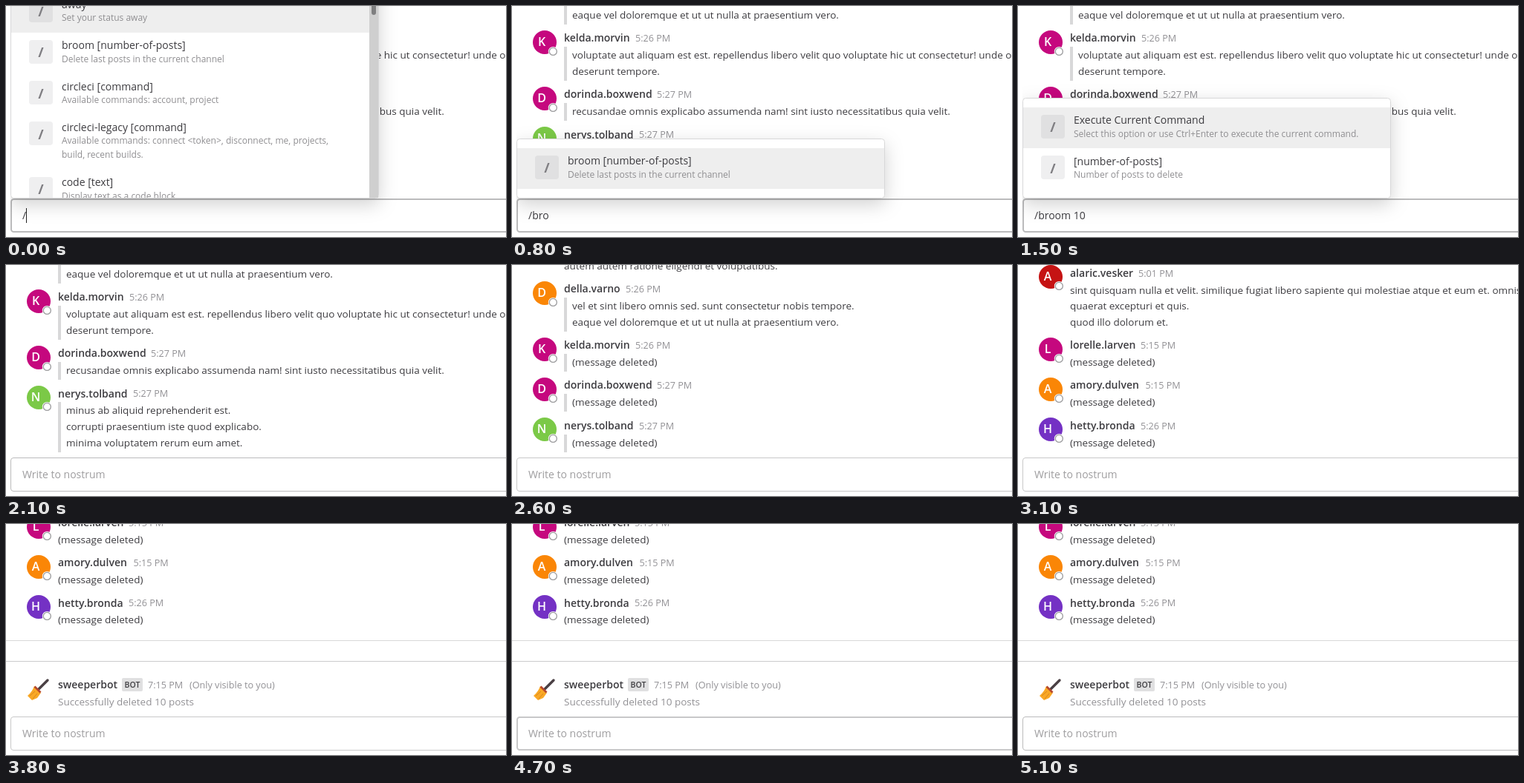
Write an HTML page that moves like this. It is 673 px wide and 312 px high and loops after 5400 ms.

```html
<!DOCTYPE html>
<html lang="en">
<head>
<meta charset="utf-8">
<title>Broom command</title>
<style>
  html, body { margin: 0; width: 100%; height: 100%; overflow: hidden; background: #fff; }
  svg { display: block; width: 673px; height: 312px; font-family: "Open Sans", sans-serif; fill: #3d3c40; }
  text { white-space: pre; }
  .popup-box { fill: #fff; stroke: #d8d8d9; filter: drop-shadow(0 8px 12px rgba(0, 0, 0, .18)); }
</style>
</head>
<body>
<svg id="stage" viewBox="0 0 673 312"></svg>
<script>
const LOOP = 5400;
const MUTED = '#929195';
const LINE = 21.6;
const MAGENTA = '#c5087e', ORANGE = '#fa8606', GREEN = '#7bc947', RED = '#c51313', PURPLE = '#7431c4';

// Oldest first; replies belong to the thread started by the post before them.
const posts = [
  { name: 'lorna.dustel', time: '5:01 PM', timeX: 160, color: GREEN,
    lines: ['et dolorem aut quia nesciunt. voluptas sed omnis rerum et quasi tempora. ut eaque iste natus error sit.', 'rerum et quasi velit.'] },
  { name: 'alaric.vesker', time: '5:01 PM', timeX: 162, color: RED,
    lines: ['sint quisquam nulla et velit. similique fugiat libero sapiente qui molestiae atque et eum et. omnis qui', 'quaerat excepturi et quis.', 'quod illo dolorum et.'] },
  { name: 'lorelle.larven', time: '5:15 PM', timeX: 165, color: MAGENTA,
    lines: ['qui dolores et quas molestias. sed ut perspiciatis unde omnis iste natus voluptatem et fugit rerum.', 'tempora autem est.'] },
  { name: 'amory.dulven', time: '5:15 PM', timeX: 171.5, color: ORANGE,
    lines: ['aut odit fugit et consequuntur magni dolores.'] },
  { name: 'hetty.bronda', time: '5:26 PM', timeX: 165, color: PURPLE,
    lines: ['nihil molestiae quia et voluptas. aspernatur aut odit sed quia consequuntur magni dolores eos qui.', 'autem autem ratione eligendi et voluptatibus.'] },
  { name: 'della.varno', time: '5:26 PM', timeX: 153, color: ORANGE, reply: true,
    lines: ['vel et sint libero omnis sed. sunt consectetur nobis tempore.', 'eaque vel doloremque et ut ut nulla at praesentium vero.'] },
  { name: 'kelda.morvin', time: '5:26 PM', timeX: 166, color: MAGENTA, reply: true,
    lines: ['voluptate aut aliquam est est. repellendus libero velit quo voluptate hic ut consectetur! unde omnis', 'deserunt tempore.'] },
  { name: 'dorinda.boxwend', time: '5:27 PM', timeX: 195, color: MAGENTA, reply: true,
    lines: ['recusandae omnis explicabo assumenda nam! sint iusto necessitatibus quia velit.'] },
  { name: 'nerys.tolband', time: '5:27 PM', timeX: 171, color: GREEN, reply: true,
    lines: ['minus ab aliquid reprehenderit est.', 'corrupti praesentium iste quod explicabo.', 'minima voluptatem rerum eum amet.'] }
];
const ROOT_DELETED = 5;

const broom = ['broom [number-of-posts]', 'Delete last posts in the current channel'];
const popups = {
  all: { top: -40, first: -19.4, scroll: true, items: [
    ['away', 'Set your status away'],
    broom,
    ['circleci [command]', 'Available commands: account, project'],
    ['circleci-legacy [command]', 'Available commands: connect &lt;token&gt;, disconnect, me, projects,', 'build, recent builds.'],
    ['code [text]', 'Display text as a code block']
  ] },
  match: { top: 180, first: 192, items: [broom] },
  args: { top: 125, first: 137, items: [
    ['Execute Current Command', 'Select this option or use Ctrl+Enter to execute the current command.'],
    ['[number-of-posts]', 'Number of posts to delete']
  ] }
};

// Each step keeps the values of the one before it.
const steps = [
  [0, { typed: '/', popup: 'all', caret: true, focus: true, border: '#bbbbbc', deleted: 0, bot: false }],
  [600, { typed: '/b', popup: 'match', caret: false }],
  [700, { typed: '/br' }],
  [800, { typed: '/bro' }],
  [900, { typed: '/broo' }],
  [1000, { typed: '/broom' }],
  [1200, { typed: '/broom ', popup: 'args' }],
  [1400, { typed: '/broom 1' }],
  [1500, { typed: '/broom 10' }],
  [2100, { typed: '', popup: '', focus: false }],
  [2300, { deleted: 1, border: '#c8c8c9' }],
  [2400, { deleted: 2 }],
  [2600, { deleted: 3 }],
  [2700, { deleted: 4 }],
  [2900, { deleted: 5 }],
  [3000, { deleted: 6 }],
  [3100, { deleted: 7 }],
  [3200, { deleted: 8 }],
  [3300, { deleted: 9 }],
  [3800, { bot: true }],
  [4000, { focus: true }],
  [5100, { focus: false, border: '#bbbbbc' }]
];
let state = {};
const states = steps.map(([, change]) => (state = { ...state, ...change }));

// y is the middle of the line of text
const text = (x, y, str, size = 13.5, extra = '') =>
  `<text x="${x}" y="${Math.round(y + size * .37)}" font-size="${size}" ${extra}>${str}</text>`;
const rect = (x, y, w, h, fill, extra = '') =>
  `<rect x="${x}" y="${y}" width="${w}" height="${h}" fill="${fill}" ${extra}/>`;
const fill = color => `fill="${color}"`;
const BOLD = 'font-weight="600"';

function avatar(post, nameY) {
  const y = Math.round(nameY + 5.8);
  return `<circle cx="44" cy="${y}" r="16" fill="${post.color}"/>` +
    text(40, y - .6, post.name[0].toUpperCase(), 16, `fill="#fff" text-anchor="middle" ${BOLD}`) +
    `<circle cx="55.3" cy="${y + 12.4}" r="6.5" fill="#fff"/>` +
    `<circle cx="55.3" cy="${y + 12.4}" r="5" fill="#fff" stroke="#9a9a9c" stroke-width="1.3"/>`;
}

function chat({ deleted, bot }) {
  const visible = deleted >= ROOT_DELETED ? posts.filter(p => !p.reply) : posts;
  let out = '', bottom = bot ? 130 : 240.2;
  for (const post of [...visible].reverse()) {
    const gone = posts.length - posts.indexOf(post) <= deleted;
    const lines = gone ? ['(message deleted)'] : post.lines;
    const first = bottom - LINE * (lines.length - 1);
    const nameY = first - 23.6;
    if (post.reply) {
      const barTop = Math.floor(first - 11.2);
      out += rect(70, barTop, 4, Math.ceil(bottom + 12) - barTop, '#d8d8d9');
    }
    lines.forEach((line, i) => out += text(post.reply ? 81 : 70, first + i * LINE - .55, line));
    out += text(70, nameY, post.name, 14, BOLD) +
      text(post.timeX, nameY + .4, post.time, 12.6, fill(MUTED)) + avatar(post, nameY);
    bottom = nameY - 30.7;
    if (bottom < -12) break;
  }
  return out + (bot ? botPost() : '');
}

function botPost() {
  return rect(0, 157, 673, 1, '#d8d8d9') + rect(0, 185, 673, 1, '#cbcbcc') +
    `<path d="M56 211L42 225" stroke="#4a4044" stroke-width="3.4" stroke-linecap="round"/>
     <path d="M38 219L47 228L42 235L35 238L29 232Q35 227 38 219Z" fill="#f9a825"/>
     <path d="M32 232L39 226M36 236L42 229" stroke="#d9861c" stroke-width="1"/>
     <path d="M38.5 219.5L46.5 227.5" stroke="#b5472f" stroke-width="2.6"/>` +
    text(70, 217, 'sweeperbot', 14, BOLD) +
    rect(156, 208, 28, 18, '#e0e0e1', 'rx="2"') +
    text(170, 217, 'BOT', 10.5, BOLD + ' text-anchor="middle"') +
    text(191, 217.4, '7:15 PM', 12.6, fill(MUTED)) +
    text(247, 217.4, '(Only visible to you)', 12.6, fill(MUTED)) +
    text(70, 240.2, 'Successfully deleted 10 posts', 13.5, fill(MUTED));
}

function popup(key) {
  const { top, first, items, scroll } = popups[key];
  const box = `<rect class="popup-box" x="6.5" y="${top - .5}" width="495" height="${260 - top}" rx="4"/>`;
  let out = '', y = first;
  items.forEach(([title, ...notes], i) => {
    const height = 55.4 + (notes.length - 1) * 18.8;
    if (i === 0) out += rect(7, Math.round(y), 494, Math.round(height), '#eeeeee');
    out += rect(31, Math.round(y + 9.6), 32, 32, i ? '#efeff0' : '#e0e0e1', 'rx="4"') +
      text(47, y + 26.6, '/', 18, 'fill="#7f7e82" font-weight="700" text-anchor="middle"') +
      text(75, y + 17, title, 14);
    notes.forEach((note, n) => out += text(75, y + 35.2 + n * 18.8, note, 12, fill('#8f8e91')));
    y += height;
  });
  if (scroll) out += rect(489, 0, 12, 259, '#cfcfcf') + rect(492, -20, 6, 32, '#7f7f80', 'rx="3"');
  return `<g clip-path="url(#shadowArea)">${box}</g><g clip-path="url(#listArea)">${out}</g>`;
}

function input({ typed, caret, focus, border }) {
  const ring = focus ? 2 : 1;
  return rect(0, 260, 673, 52, '#fff') +
    rect(6 + ring / 2, 260 + ring / 2, 700, 46 - ring, '#fff', `rx="3.5" stroke="${border}" stroke-width="${ring}"`) +
    (typed ? text(22, 283, typed, 14) : text(22, 283, 'Write to nostrum', 14, fill('#9e9d9f'))) +
    (caret ? rect(27, 273, 1, 20, '#222') : '');
}

const stage = document.getElementById('stage');
const clips = '<clipPath id="shadowArea"><rect x="6" y="0" width="667" height="312"/></clipPath>' +
  '<clipPath id="listArea"><rect x="6" y="0" width="496" height="259"/></clipPath>';
const start = performance.now();
let shown = -1;

function frame() {
  const t = (performance.now() - start) % LOOP;
  const index = steps.findLastIndex(([at]) => at <= t);
  if (index !== shown) {
    const now = states[shown = index];
    stage.innerHTML = clips + chat(now) + input(now) + (now.popup ? popup(now.popup) : '');
  }
  requestAnimationFrame(frame);
}
frame();
</script>
</body>
</html>
```
